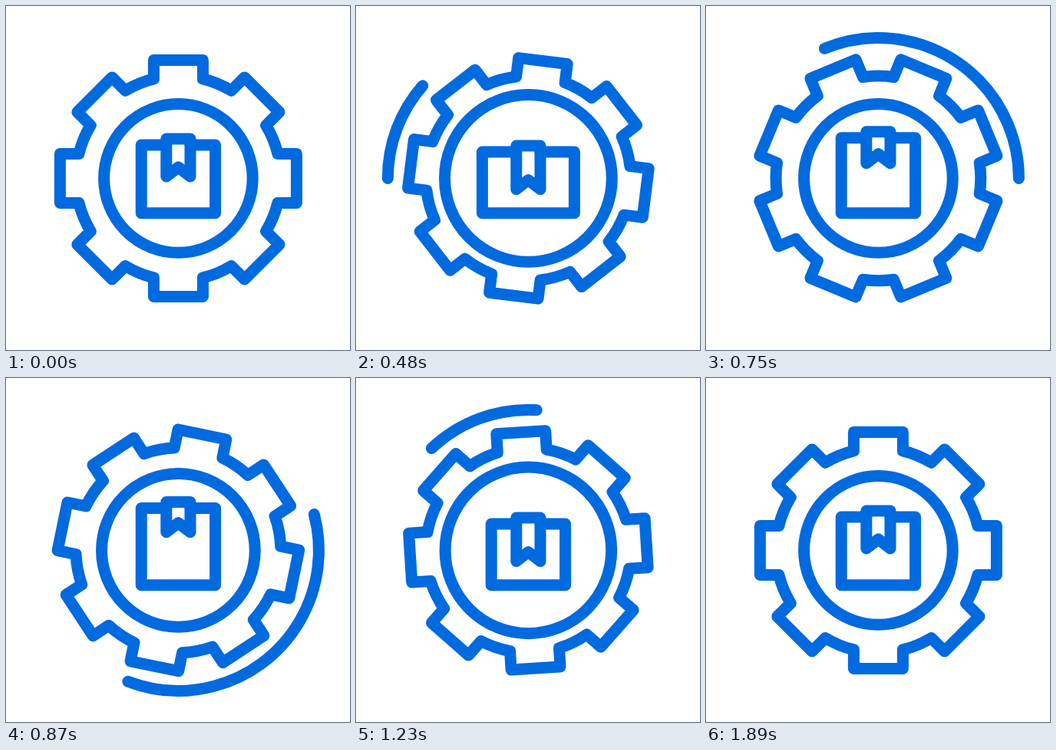
Write an HTML page with a canvas that moves like this. It is 448 px wide and 448 px high and loops after 2250 ms.

```html
<!DOCTYPE html>
<html lang="en">
<head>
<meta charset="utf-8">
<title>Package gear</title>
<style>
  html, body { margin: 0; width: 100%; height: 100%; overflow: hidden; background: #fff; }
  canvas { display: block; width: 448px; height: 448px; }
</style>
</head>
<body>
<canvas id="stage" width="448" height="448"></canvas>
<script>
const ctx = document.getElementById('stage').getContext('2d');
const LOOP = 2250, STEP = 30, SETTLED = 1890;
const C = 224.4, RAD = Math.PI / 180;

// Smooth curve through [time, value] keys, flat at turning points and ends.
function track(...keys) {
  const rate = (a, b) => (b[1] - a[1]) / (b[0] - a[0]);
  const slopes = keys.map((k, i) => {
    const prev = keys[i - 1], next = keys[i + 1];
    if (!prev || !next || rate(prev, k) * rate(k, next) <= 0) return 0;
    return rate(prev, next);
  });
  return t => {
    if (t <= keys[0][0]) return keys[0][1];
    const i = keys.findIndex(k => k[0] > t) - 1;
    if (i < 0) return keys[keys.length - 1][1];
    const [t0, v0] = keys[i], [t1, v1] = keys[i + 1];
    const span = t1 - t0, x = (t - t0) / span, y = 1 - x;
    return v0 * y * y * (1 + 2 * x) + v1 * x * x * (3 - 2 * x)
      + span * x * y * (slopes[i] * y - slopes[i + 1] * x);
  };
}

const gearTurn = track([0, 0], [210, -10], [480, 7.1], [750, 67.5], [990, 134.4],
  [1230, 176.4], [1470, 188.9], [1890, 180]);
const ringRadius = track([0, 96.8], [430, 109.8], [735, 96.8], [1165, 109.8], [1470, 96.8]);
const boxTop = track([0, 181], [480, 190], [750, 171.7], [870, 169.5], [990, 173.5],
  [1230, 190], [1470, 181]);
const boxHalf = track([0, 48.2], [480, 60], [750, 48.2]);
const arcHead = track([390, 180], [480, 221.2], [540, 257.5], [750, 360], [990, 574],
  [1230, 633.4], [1350, 645]);
const arcTail = track([390, 180], [480, 180], [750, 247.5], [990, 453.1],
  [1230, 586.5], [1350, 645]);

function line(points, closed) {
  ctx.beginPath();
  points.forEach(p => ctx.lineTo(...p));
  if (closed) ctx.closePath();
  ctx.stroke();
}

function circleArc(r, from, to) {
  ctx.beginPath();
  ctx.arc(C, C, r, from * RAD, to * RAD);
  ctx.stroke();
}

function drawGear(angle) {
  const half = 32, tip = 154, base = 129.5;
  const root = Math.hypot(half, base), spread = Math.atan2(half, base);
  ctx.save();
  ctx.translate(C, C);
  ctx.rotate(angle * RAD);
  ctx.beginPath();
  for (let i = 0; i < 8; i++) {
    ctx.lineTo(-half, -base);
    ctx.lineTo(-half, -tip);
    ctx.lineTo(half, -tip);
    ctx.lineTo(half, -base);
    ctx.arc(0, 0, root, spread - Math.PI / 2, -Math.PI / 4 - spread);
    ctx.rotate(Math.PI / 4);
  }
  ctx.closePath();
  ctx.stroke();
  ctx.restore();
}

function drawBox(top, half) {
  const bottom = 269.8, left = C - 15.6, right = C + 15.6;
  const ribbonTop = top - 8, ribbonEnd = 222 + (top - 181) * 1.85;
  line([[left, top], [C - half, top], [C - half, bottom],
    [C + half, bottom], [C + half, top], [right, top]]);
  line([[left, ribbonTop], [right, ribbonTop], [right, ribbonEnd],
    [C, ribbonEnd - 12], [left, ribbonEnd]], true);
}

function draw(t) {
  ctx.fillStyle = '#fff';
  ctx.fillRect(0, 0, 448, 448);
  ctx.strokeStyle = '#006ade';
  ctx.lineWidth = 15;
  ctx.lineCap = ctx.lineJoin = 'round';
  drawGear(gearTurn(t));
  circleArc(ringRadius(t), 0, 360);
  drawBox(boxTop(t), boxHalf(t));
  const head = arcHead(t), tail = arcTail(t);
  if (head - tail > 0.5) circleArc(183, tail, head);
}

const start = performance.now();
function tick() {
  const t = (performance.now() - start) % LOOP;
  draw(Math.min(SETTLED, Math.floor(t / STEP) * STEP));
  requestAnimationFrame(tick);
}
tick();
</script>
</body>
</html>
```
